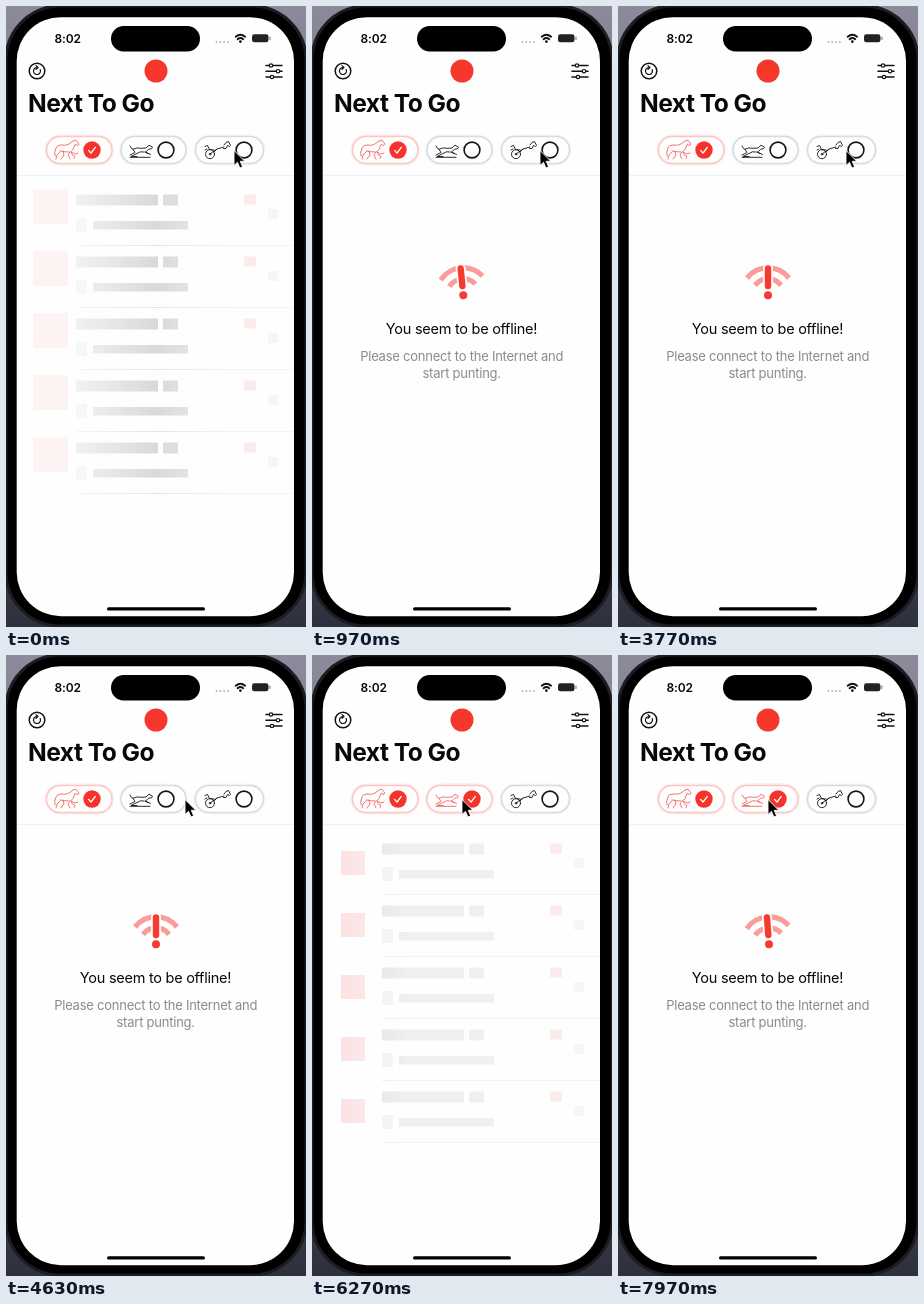
These frames come from a looping animation (300x621 px, 8000 ms). An HTML page:

```html
<!DOCTYPE html>
<html lang="en">
<head>
<meta charset="utf-8">
<title>Next To Go</title>
<style>
  html, body { margin: 0; width: 100%; height: 100%; overflow: hidden; background: linear-gradient(#8b8b9c, #2e303e); }
  svg { display: block; width: 100%; height: 100%; }
  text { font-family: Inter, Roboto, sans-serif; fill: #080808; }
  .line { fill: none; stroke-linecap: round; stroke-linejoin: round; }
  .animal { stroke-width: .9; }
  .muted { fill: #8a8a8c; font-size: 13px; letter-spacing: -.23px; }
</style>
</head>
<body>
<svg id="stage" viewBox="0 0 300 621" preserveAspectRatio="none">
  <defs>
    <linearGradient id="shimmer" gradientUnits="userSpaceOnUse" x1="-75" x2="75" y1="0" y2="0">
      <stop offset="0" stop-color="#fff" stop-opacity=".38"/>
      <stop offset=".5" stop-color="#fff"/>
      <stop offset="1" stop-color="#fff" stop-opacity=".38"/>
    </linearGradient>
    <mask id="band" maskUnits="userSpaceOnUse" x="0" y="170" width="300" height="350">
      <rect y="170" width="300" height="350" fill="url(#shimmer)"/>
    </mask>
  </defs>

  <rect x="0" y="0" width="300" height="620" rx="54" stroke="#1c1c22" stroke-width="3"/>
  <rect x="10.7" y="11.2" width="277.3" height="599" rx="44" fill="#fefefe"/>

  <!-- Status bar -->
  <text x="48.5" y="37" font-size="12" font-weight="600" letter-spacing="-.15">8:02</text>
  <rect x="105" y="20" width="89" height="25.5" rx="12.7"/>
  <path class="line" d="M210.5 36h13" stroke="#b8b8b8" stroke-width="2" stroke-dasharray="0 3.8"/>
  <g class="line" stroke="#111" stroke-width="1.9">
    <path d="M229.7 30.7q4.7-4 9.4 0M231.6 33.2q2.8-2.4 5.6 0"/>
  </g>
  <circle cx="234.4" cy="35.6" r="1.3"/>
  <rect x="246" y="28.3" width="16.5" height="8" rx="2.4" fill="#222"/>
  <path class="line" d="M264 31.2v2.2" stroke="#888" stroke-width="1.2"/>

  <!-- Navigation -->
  <g class="line" stroke="#111" stroke-width="1.5">
    <circle cx="31" cy="65" r="7.8"/>
    <path d="M34.2 63.6A3.5 3.5 0 1 1 31 61.5M30 59.6l2 1.9-2 1.8" stroke-width="1.2"/>
    <path d="M260 59.5h16M260 65.2h16M260 71h16"/>
    <g fill="#fefefe" stroke-width="1.2">
      <circle cx="265" cy="59.5" r="1.7"/><circle cx="272" cy="65.2" r="1.7"/><circle cx="266" cy="71" r="1.7"/>
    </g>
  </g>
  <circle cx="150" cy="65" r="11.5" fill="#f5372c"/>
  <text x="22" y="106" font-size="24.6" font-weight="700" letter-spacing="-.52">Next To Go</text>
  <path d="M11 169.5h277" stroke="#f0f0f3"/>

  <g id="chips"></g>
  <g mask="url(#band)"><g id="skeleton"></g></g>

  <g id="offline">
    <g id="signal">
      <path d="M129 272A27 27 0 0 1 171 272M137 279.3A16.5 16.5 0 0 1 163 279.3" fill="none" stroke="#fa9d98" stroke-width="5.2"/>
      <path class="line" d="M150 262.4v17.6" stroke="#fefefe" stroke-width="10"/>
      <path class="line" d="M150 262.4v17.6" stroke="#f63a30" stroke-width="6.4"/>
      <circle cx="150" cy="289.3" r="4" fill="#f63a30"/>
    </g>
    <g text-anchor="middle">
      <text x="149.5" y="328" font-size="14.5" letter-spacing="-.26">You seem to be offline!</text>
      <text class="muted" x="149.7" y="355">Please connect to the Internet and</text>
      <text class="muted" x="149.7" y="372">start punting.</text>
    </g>
  </g>

  <rect x="101" y="601.3" width="98" height="3.2" rx="1.6"/>
  <path id="cursor" d="M0 0V15L3.5 11.8L5.9 17.5L8.6 16.3L6.2 10.8H10.8Z" stroke="#fff" stroke-width=".9"/>
</svg>

<script>
const $ = id => document.getElementById(id);
const RED = '#f5332b', DARK = '#151515';

const horse = `<path d="M49 150q-1-4 1-8q1-3 5-3q5 1 8-1l4-3 3-.8 3 4-1 1.3-3-1-2 5-2 2 1 3 3 2-1 2M64 146l-2 3 2 4M54 146l-3 3-1 4M57 145l1 4-3 4M54 145q5 1 9 1M65 146l4 2 3-1"/>`;
const hound = `<path d="M124 140q1 3 3 3.3q4-2.3 8-1l5-.3 3-2.8 3.5 2-1 1.6-3 .4-3 3 5 2.2M139 146l3 1.5M138 146q-4-1-6 1l-7 3.5h6M127 143.3l2 3.2-5 2.5M124 151.3h20"/>`;
const harness = `<circle cx="204" cy="148.2" r="4.5"/><circle cx="204" cy="148.2" r=".8"/>
  <path d="M204 148l7-5 7-2M199 140.5l2.5-1 2 4 4.5.5M199 144l2-1M218 139l2-2.5 2.5-1 2 4-1 1-2-1-1.5 3-2.5 0M211 143l-3 3"/>`;

const tick = x => `<circle cx="${x}" cy="144" r="8.7" fill="${RED}"/>
  <path class="line" d="M${x - 3.4} 144.4l2.4 2.7 4.3-5.7" stroke="#fff" stroke-width="1.4"/>`;
const ring = x => `<circle cx="${x}" cy="144" r="7.9" fill="none" stroke="${DARK}" stroke-width="1.6"/>`;

function chipState(x, width, dot, icon, selected) {
  const [glow, edge, ink] = selected ? ['#fdeeee', '#fbc6c4', '#f2665f'] : ['#f5f5f8', '#d9d9e2', DARK];
  const pill = (color, w) =>
    `<rect x="${x}" y="130.5" width="${width}" height="27" rx="13.5" fill="#fefefe" stroke="${color}" stroke-width="${w}"/>`;
  return pill(glow, 4) + pill(edge, 1.5) +
    `<g class="line animal" stroke="${ink}">${icon}</g>` + (selected ? tick : ring)(dot);
}

$('chips').innerHTML =
  chipState(40.5, 65.5, 86, horse, true) +
  chipState(115, 65, 160, hound, false) +
  `<g id="houndOn">${chipState(115, 65, 160, hound, true)}</g>` +
  chipState(189.5, 68, 238, harness, false);

const block = (x, y, w, h, color = '#d9d9dc') =>
  `<rect x="${x}" y="${y}" width="${w}" height="${h}" fill="${color}"/>`;

let rows = '';
for (let i = 0; i < 5; i++) {
  rows += `<g transform="translate(0 ${i * 62})">
    <g class="large">${block(27, 183, 35, 35, '#fce2e0')}</g>
    <g class="small">${block(29, 196, 24, 24, '#fbdfe0')}</g>
    ${block(70, 188.5, 82, 11)}${block(157, 188.5, 15, 11)}
    ${block(238, 188.5, 12, 10, '#f6cfce')}${block(70, 212, 11, 14, '#ececef')}
    ${block(87, 215, 95, 8.5)}${block(262, 203, 10, 10, '#ebebee')}
    <path d="M70 239.5h218" stroke="#dcdce8" stroke-width=".8"/></g>`;
}
$('skeleton').innerHTML = rows;

const ramp = (t, from, to) => Math.min(1, Math.max(0, (t - from) / (to - from)));
const smooth = x => x * x * (3 - 2 * x);

function wiggle(t, start) {
  const age = t - start;
  if (age < 0 || age > 900) return 0;
  return -7 * Math.sin(age * Math.PI * 2 / 600) * (1 - age / 900);
}

function draw(t) {
  const loading = 1 - ramp(t, 500, 750) + ramp(t, 5320, 5620) - ramp(t, 7600, 7850);
  $('skeleton').setAttribute('opacity', loading);
  $('offline').setAttribute('opacity', 1 - loading);
  const sweep = (t / 1677 + .5) % 1;
  $('shimmer').setAttribute('gradientTransform', `translate(${500 * sweep - 100} 0)`);
  const second = t > 4000;
  document.querySelectorAll('.large').forEach(e => e.style.display = second ? 'none' : '');
  document.querySelectorAll('.small').forEach(e => e.style.display = second ? '' : 'none');

  $('signal').setAttribute('transform', `rotate(${wiggle(t, 800) + wiggle(t, 7900)} 150 276)`);
  $('houndOn').setAttribute('opacity', ramp(t, 5180, 5300));
  const x = 228 - 78 * smooth(ramp(t, 4250, 4900));
  $('cursor').setAttribute('transform', `translate(${x} 144.5)`);
}

const begin = performance.now();
function frame() {
  draw((performance.now() - begin) % 8000);
  requestAnimationFrame(frame);
}
frame();
</script>
</body>
</html>
```
